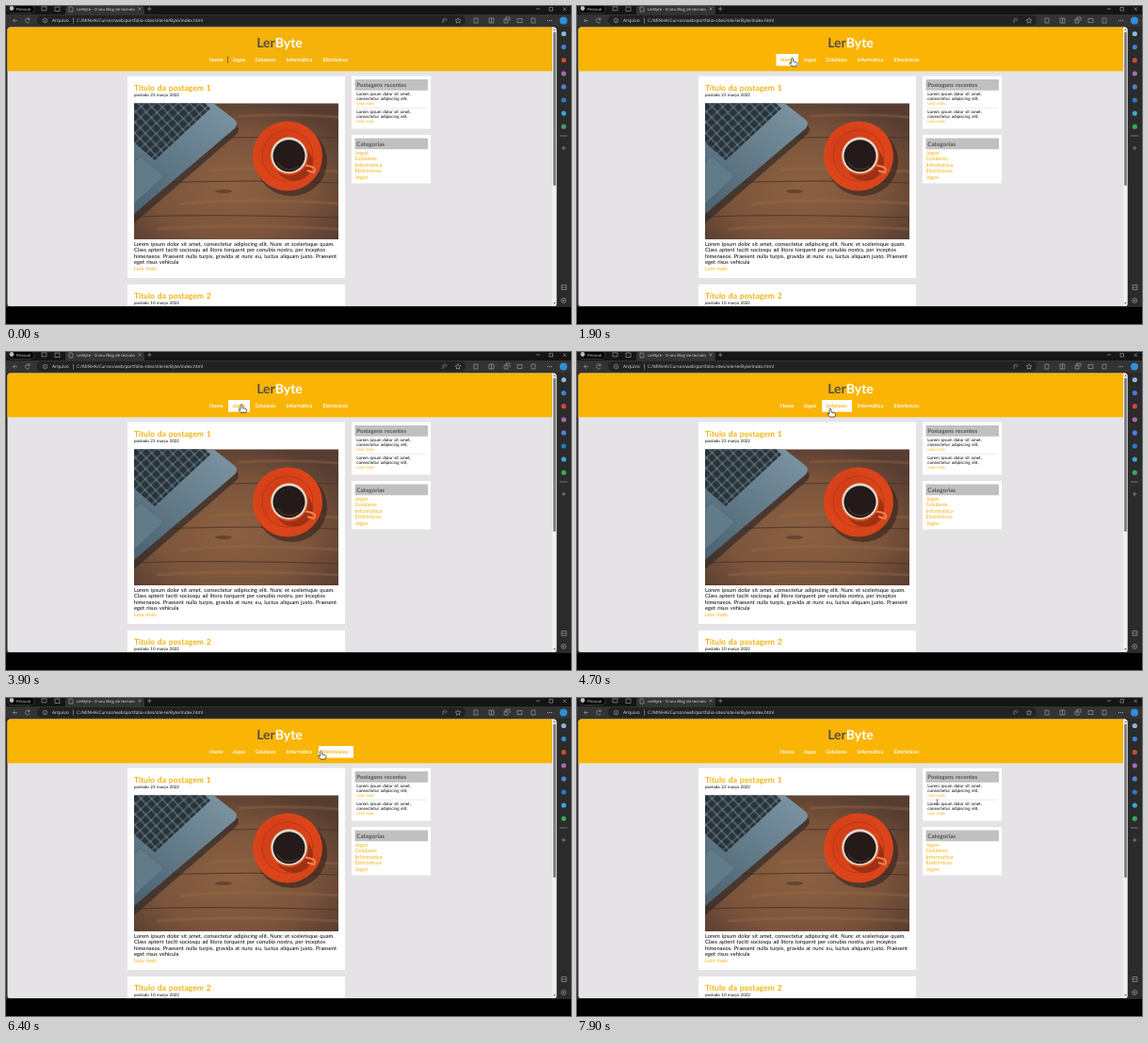
An HTML page that plays this animation: 600 px wide and 338 px high, repeating every 8000 ms.

```html
<!DOCTYPE html>
<html lang="pt">
<head>
<meta charset="utf-8">
<title>LerByte</title>
<style>
  html, body { margin: 0; width: 100%; height: 100%; overflow: hidden; background: #000; }
  svg { display: block; width: 100vw; height: 100vh; }
  text { font-family: Lato, sans-serif; word-spacing: .1em; text-rendering: geometricPrecision; white-space: pre; }
  .ui text { font-family: "Open Sans", sans-serif; word-spacing: 0; fill: #dedede; }
  .bold { font-weight: 700; }
  .accent { fill: #f4b312; }
  .line { fill: none; stroke: #aaa; stroke-width: .6; }
</style>
</head>
<body>
<svg viewBox="0 0 600 338">
  <defs>
    <radialGradient id="wood" cx=".48" cy=".6" r=".65">
      <stop stop-color="#8c6141"/><stop offset=".6" stop-color="#7b543b"/><stop offset="1" stop-color="#573d31"/>
    </radialGradient>
    <radialGradient id="saucer" cx=".4" cy=".4" r=".65">
      <stop stop-color="#c93a18"/><stop offset=".7" stop-color="#dd4519"/><stop offset="1" stop-color="#d6431c"/>
    </radialGradient>
    <linearGradient id="metal" x1=".9" x2=".2" y2="1">
      <stop stop-color="#7d95a2"/><stop offset="1" stop-color="#4d6574"/>
    </linearGradient>
    <pattern id="keys" width="8" height="8" patternUnits="userSpaceOnUse" patternTransform="rotate(-43)">
      <rect width="8" height="8" fill="#627580"/>
      <rect x=".6" y=".6" width="6.800" height="6.800" rx="1" fill="#28333a"/>
    </pattern>
    <clipPath id="photo"><rect x="136" y="103.500" width="217" height="144.500"/></clipPath>
    <clipPath id="page"><path d="M1.500 317V25.500q0-3 3-3H581.500q3 0 3 3V317q0 2-2 2H3.500q-2 0-2-2Z"/></clipPath>
  </defs>

  <rect width="600" height="338"/>
  <g class="ui" id="browser">
    <rect width="600" height="320" fill="#2b2b2b"/>
    <rect width="600" height="9" fill="#151515"/>
    <path d="M63 9V2q0-2 2-2H145q2 0 2 2V9Z" fill="#333"/>
    <rect y="9" width="600" height="13" fill="#333"/>
    <rect x="33" y="10" width="455" height="10.500" rx="5" fill="#222"/>
    <rect x="2" y="-1" width="28" height="8.500" rx="4.200" fill="#000" stroke="#666" stroke-width=".5"/>
    <circle cx="6" cy="2.500" r="2.400" fill="#bbb"/>
    <text x="11" y="4.800" font-size="4.300">Pessoal</text>
    <text x="75" y="5" font-size="4.250">LerByte - O seu Blog de tecnolo</text>
    <text x="49" y="17" font-size="4.900">Arquivo</text>
    <text x="75" y="17" font-size="4.750">C:/MINHA/Cursos/web/portfolio-sites/site-lerByte/index.html</text>
    <path class="line" d="M38 .8h5v4h-5zM52 1h5v4.500h-5zM67 1h3l1 1v4h-4zM140.500 1.500l3 3m0-3l-3 3M150 3h4.500M152.200 .8v4.500
      M563 3h4M577 1.500h3.500v3.500H577zM591.500 1.500l3.500 3.500m0-3.500l-3.500 3.500
      M12 15.500H7.500m2-2l-2 2 2 2M25 14a2.400 2.400 0 1 0 .2 2.500M25 12.500v2h-2M71.500 12.500v6
      M464 18v-4h2m0-1.500l2 2-2 2M480 12.700l.9 1.900 2 .2-1.500 1.400.4 2-1.800-1-1.800 1 .4-2-1.500-1.400 2-.2z
      M497 13h4v5h-4zM513 13h5v5h-5zM515.500 13v5M529 14h4v4h-4zM531 16v-4h4v4M543 13.500h5v4h-5zM558 13h4v5h-4z
      M590 151h4.500M592.200 148.800v4.500M588 138h8M590 296.500h5v5h-5zM590 299h5"/>
    <circle class="line" cx="41.500" cy="15.500" r="2.300"/><path class="line" d="M41.500 15v2m0-3v.4"/>
    <circle class="line" cx="592.200" cy="313" r="2.500"/><circle class="line" cx="592.200" cy="313" r=".8"/>
    <path d="M575 15.500h.8m1.200 0h.8m1.200 0h.8" stroke="#ccc"/>
    <circle cx="592" cy="15.500" r="4" fill="#2f8fd8"/>
  </g>

  <g clip-path="url(#page)">
    <rect y="22" width="586" height="298" fill="#e5e3e6"/>
    <rect id="header" y="22" width="580" height="47.300"/>
    <text class="bold" x="290.500" y="44" font-size="14" text-anchor="middle" fill="#555049">Ler<tspan fill="#fff">Byte</tspan></text>
    <g id="nav"></g>

    <path d="M129 74.500H360V289H129ZM129 296H360V320H129ZM367 74.500H451V130.500H367ZM367 137H451V188.500H367Z" fill="#fff"/>
    <path d="M370.500 78H448V89.700H370.500ZM370.500 140.500H448V152.300H370.500Z" fill="#c1c0c1"/>
    <path d="M372 108.200H447" stroke="#ddd" stroke-width=".6"/>
    <g id="copy"></g>

    <g clip-path="url(#photo)">
      <rect x="136" y="103" width="217" height="146" fill="url(#wood)"/>
      <path d="M136 143Q245 138 353 140M136 189Q250 184 353 188M136 224Q240 221 353 225" fill="none" stroke="#432e25" stroke-width="1.200" opacity=".65"/>
      <path d="M160 237Q240 231 353 237M185 211Q235 203 353 210M215 175Q240 170 353 176M247 117Q300 114 353 118" fill="none" stroke="#9b6d49" stroke-width="3" opacity=".35"/>
      <ellipse cx="231" cy="197" rx="9" ry="2" fill="#4d3428" opacity=".6"/>
      <path d="M136 104H218L246 128Q248 132 245 136L136 231Z" fill="#2b2727" opacity=".65"/>
      <path d="M136 103H220L243 121Q247 125 243 130L136 221Z" fill="url(#metal)"/>
      <path d="M136 103H211L217 109 158 164 136 145Z" fill="url(#keys)"/>
      <path d="M136 166L143 160 168 181 136 210Z" fill="#627b89" stroke="#4b6270" stroke-width=".6"/>
      <ellipse cx="303" cy="165" rx="38" ry="37" fill="#2d1d18" opacity=".55"/>
      <circle cx="299" cy="159.500" r="37" fill="url(#saucer)"/>
      <circle cx="299" cy="159" r="27" fill="none" stroke="#b53415" stroke-width=".8"/>
      <ellipse cx="306" cy="167" rx="20" ry="19" fill="#802811" opacity=".65"/>
      <path d="M317 169l8 2q5 2 2 6l-7-2" fill="none" stroke="#ef8250" stroke-width="2"/>
      <circle cx="300.500" cy="159.500" r="20.300" fill="#e0501f"/>
      <circle cx="300.500" cy="158.800" r="19.200" fill="#e3d8cd"/>
      <circle cx="300.500" cy="159.200" r="17" fill="#231a19"/>
      <path d="M288 166a15 15 0 0 0 23 4" fill="none" stroke="#4a3027" stroke-width="1.500"/>
    </g>

    <rect x="580" y="22" width="6" height="298" fill="#f1f0f1"/>
    <rect x="581.200" y="27.500" width="2.600" height="163.500" rx="1.300" fill="#77777a"/>
    <path d="M581.200 26l1.300-2 1.300 2zM581.200 315l1.300 2 1.300-2z" fill="#777"/>
  </g>

  <g id="cursor" stroke-linejoin="round">
    <path id="hand" d="M-1 .8Q0-.8 1 .8V4L5 5Q6 5.500 5.500 7L4.500 9H-.5L-3 6Q-3 4.500-1 6Z" fill="#fff" stroke="#222" stroke-width=".7"/>
    <path id="arrow" d="M0 0V8L1.900 6.200 3.200 9 4.500 8.400 3.200 5.700H5.700Z" fill="#fff" stroke="#222" stroke-width=".6"/>
    <path id="beam" d="M-1-2.700H1M0-2.700V2.700M-1 2.700H1" fill="none" stroke="#444" stroke-width=".6"/>
  </g>
</svg>
<script>
const $ = id => document.getElementById(id);
function add(parent, tag, attrs, content = '') {
  const node = document.createElementNS('http://www.w3.org/2000/svg', tag);
  for (const key in attrs) node.setAttribute(key, attrs[key]);
  node.textContent = content;
  return parent.appendChild(node);
}
const write = (x, y, size, content, cls = '') =>
  add($('copy'), 'text', { x, y, 'font-size': size, class: cls }, content);

// Article and side panels
write(136, 90, 8.5, 'Título da postagem 1', 'bold accent');
write(136, 95.5, 4.45, 'postado 23 março 2022');
['Lorem ipsum dolor sit amet, consectetur adipiscing elit. Nunc et scelerisque quam.',
 'Class aptent taciti sociosqu ad litora torquent per conubia nostra, per inceptos',
 'himenaeos. Praesent nulla turpis, gravida at nunc eu, luctus aliquam justo. Praesent',
 'eget risus vehicula'].forEach((row, i) => write(136, 254.5 + i * 6.5, 5.78, row));
write(136, 280.7, 5.8, 'Leia mais', 'accent');
write(136, 311, 8.5, 'Título da postagem 2', 'bold accent');
write(136, 316.7, 4.45, 'postado 10 março 2022');
write(372.3, 86, 6.1, 'Postagens recentes', 'bold').style.fill = '#555';
write(372.3, 148.6, 6.3, 'Categorias', 'bold').style.fill = '#555';
for (const y of [95, 114]) {
  write(372.3, y, 4.6, 'Lorem ipsum dolor sit amet,');
  write(372.3, y + 5.3, 4.6, 'consectetur adipiscing elit,');
  write(372.3, y + 10.3, 4.6, 'Leia mais', 'accent');
}
['Jogos', 'Celulares', 'Informática', 'Eletrônicos', 'Jogos']
  .forEach((name, i) => write(370.5, 157.6 + i * 6.6, 5.8, name, 'accent'));

// Sidebar buttons
['#8fb6dc', '#3c83d6', '#c84b3c', '#a36bb5', '#4b83cf', '#2d79c7', '#35a9d8', '#3aa65b']
  .forEach((fill, i) => add($('browser'), 'circle', { cx: 592.3, cy: 29.5 + i * 14.1, r: 2.6, fill }));

const nav = [['Home', 211.5, 235], ['Jogos', 236, 259], ['Celulares', 260, 292],
  ['Informática', 293, 331], ['Eletrônicos', 332, 369]].map(([name, left, right]) => ({
  left, right,
  box: add($('nav'), 'rect', { x: left, y: 51, width: right - left, height: 12.6, fill: '#fff' }),
  label: add($('nav'), 'text', { x: left + 4.6, y: 59.3, 'font-size': 5.4, class: 'bold' }, name)
}));

// Pointer hot spot: time, x, y
const path = [[0, 235.5, 57], [200, 234, 56], [700, 222, 53], [1000, 222, 53], [1300, 228, 55],
  [2300, 229, 55], [2400, 235.5, 56], [2500, 246, 55], [2600, 249, 55], [3900, 250, 55.5],
  [4300, 268, 60], [4700, 269, 60], [5400, 271, 59], [5800, 325, 57], [6000, 334, 56],
  [6800, 335, 56], [7000, 337, 58], [7100, 341, 66], [7600, 379, 104], [7800, 382, 106], [7900, 382.5, 110.7]];

function pointerAt(time) {
  const i = path.findIndex(p => p[0] > time);
  if (i < 0) return path.at(-1).slice(1);
  const [t0, x0, y0] = path[i - 1], [t1, x1, y1] = path[i];
  const k = (time - t0) / (t1 - t0);
  return [x0 + (x1 - x0) * k, y0 + (y1 - y0) * k];
}

const show = (node, on) => node.setAttribute('visibility', on ? 'visible' : 'hidden');

function draw(now) {
  const time = Math.floor(now % 8000 / 100) * 100;
  const [x, y] = pointerAt(time);
  const inRow = y > 51 && y < 63.6;
  const yellow = time < 1000 ? '#f4b20a' : '#fab504';
  let hovering = false;
  for (const item of nav) {
    const on = inRow && x >= item.left && x <= item.right;
    hovering ||= on;
    show(item.box, on);
    item.label.setAttribute('fill', on ? yellow : '#fff');
  }
  const beam = !hovering && (inRow || time >= 7900);
  show($('hand'), hovering);
  show($('beam'), beam);
  show($('arrow'), !hovering && !beam);
  $('header').setAttribute('fill', yellow);
  $('cursor').setAttribute('transform', `translate(${x} ${y})`);
  requestAnimationFrame(draw);
}
requestAnimationFrame(draw);
</script>
</body>
</html>
```
